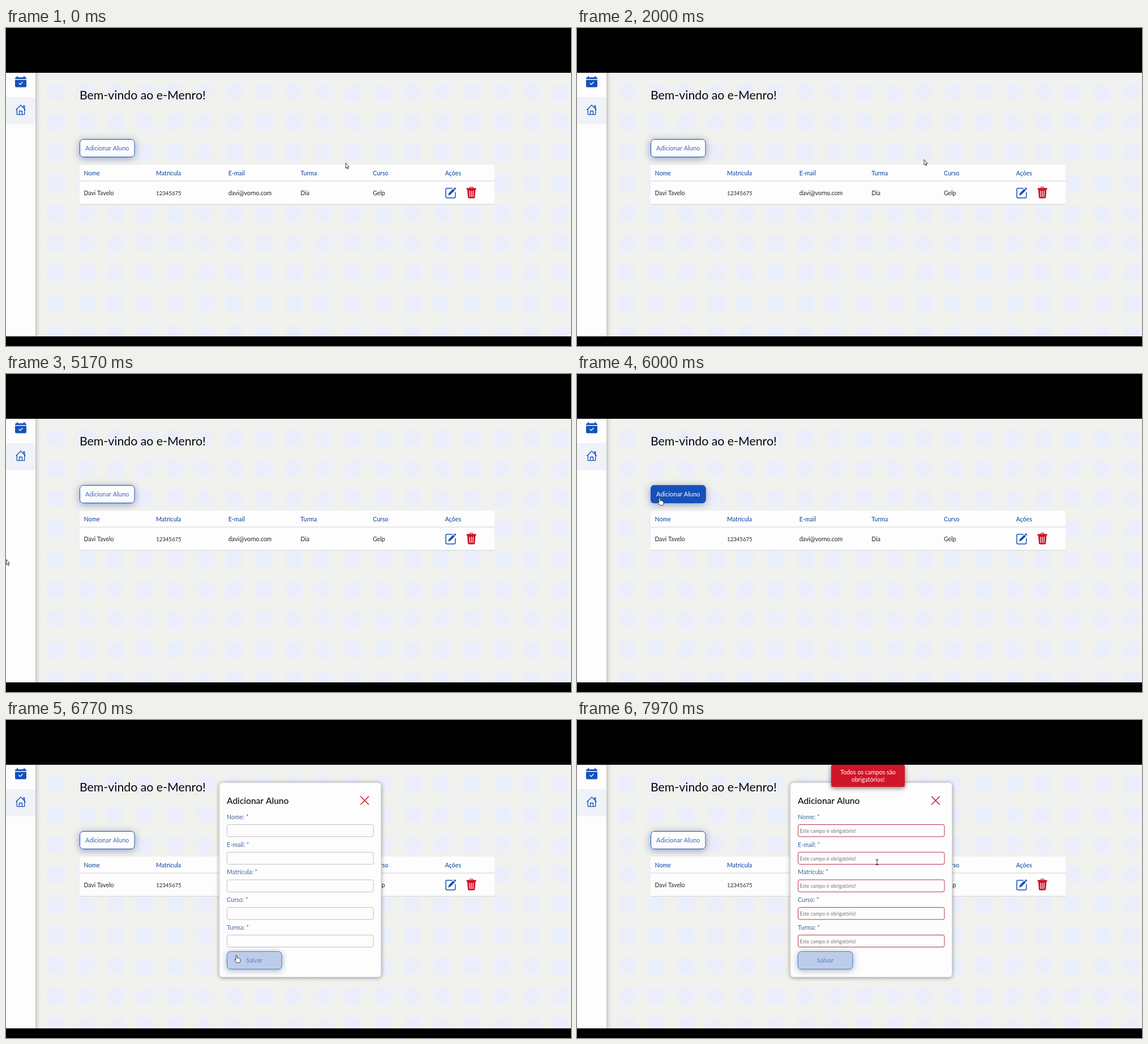
Write an HTML page with a canvas that moves like this. It is 998 by 561 pixels and loops after 8000 ms.

```html
<!DOCTYPE html>
<html lang="pt-BR">
<head>
<meta charset="utf-8">
<title>Cadastro de alunos</title>
<style>
  html, body { margin: 0; width: 100%; height: 100%; overflow: hidden; background: #000; }
  canvas { display: block; width: 100%; height: 100%; }
</style>
</head>
<body>
<canvas id="stage" width="998" height="561"></canvas>
<script>
const W = 998, H = 561, TOP = 79, BOTTOM = 544, LOOP = 8000;
const BLUE = '#1551b9', RED = '#cd1226', FONT = 'Lato, "Open Sans", sans-serif';
const MODAL_AT = 6290, ERROR_AT = 6980;
const canvas = document.getElementById('stage');
const view = canvas.getContext('2d');
let ctx = view;

const addButton = { x: 130, y: 196, w: 97.5, h: 32 };
const saveButton = { x: 390, y: 408, w: 97.5, h: 32 };
const fields = ['Nome', 'E-mail', 'Matrícula', 'Curso', 'Turma'].map((name, i) => (
  { name, x: 390, y: 184 + i * 48.7, w: 259.5, h: 22.3 }
));

// Pointer stops: time, x, y of the hotspot
const stops = [
  [0, 599.5, 238], [1750, 599.5, 238], [2350, 634, 222], [2950, 669, 195],
  [3400, 669, 195], [4150, 520, 262], [4900, 0, 327], [5230, 0, 327],
  [5820, 146, 219], [6330, 146, 219], [6710, 407, 415.5],
  [7080, 407, 415.5], [7720, 530, 251], [8000, 530, 251]
];

function pointerAt(t) {
  const i = Math.max(1, stops.findIndex(s => s[0] > t));
  const [t0, x0, y0] = stops[i - 1], [t1, x1, y1] = stops[i];
  const p = (t - t0) / (t1 - t0), e = p * p * (3 - 2 * p);
  return { x: x0 + (x1 - x0) * e, y: y0 + (y1 - y0) * e };
}

const inside = (p, r) => p.x >= r.x && p.x <= r.x + r.w && p.y >= r.y && p.y <= r.y + r.h;

function text(str, x, y, size, color, weight = 400, align = 'left') {
  ctx.font = `${weight} ${size}px ${FONT}`;
  ctx.textAlign = align;
  ctx.fillStyle = color;
  ctx.fillText(str, x, y + size * 0.36);
}

function box({ x, y, w, h }, radius, fill, border, shadow) {
  ctx.save();
  ctx.beginPath();
  ctx.roundRect(x, y, w, h, radius);
  if (shadow) [ctx.shadowColor, ctx.shadowBlur, ctx.shadowOffsetY] = shadow;
  ctx.fillStyle = fill;
  ctx.fill();
  ctx.restore();
  if (!border) return;
  ctx.strokeStyle = border;
  ctx.lineWidth = 1;
  ctx.beginPath();
  ctx.roundRect(x + 0.5, y + 0.5, w - 1, h - 1, radius);
  ctx.stroke();
}

function stroke(path, color, width, x = 0, y = 0) {
  ctx.save();
  ctx.translate(x, y);
  ctx.strokeStyle = color;
  ctx.lineWidth = width;
  ctx.lineCap = ctx.lineJoin = 'round';
  ctx.stroke(new Path2D(path));
  ctx.restore();
}

function fill(path, color, x = 0, y = 0) {
  ctx.save();
  ctx.translate(x, y);
  ctx.fillStyle = color;
  ctx.fill(new Path2D(path));
  ctx.restore();
}

function drawPattern() {
  ctx.fillStyle = '#f1f2ee';
  ctx.fillRect(0, TOP, W, BOTTOM - TOP);
  ctx.save();
  ctx.filter = 'blur(3px)';
  ctx.fillStyle = '#eaedfc';
  for (let x = 88; x < W + 20; x += 52.5)
    for (let y = 113; y < BOTTOM + 20; y += 53.4)
      ctx.fillRect(x - 14, y - 14, 28, 28);
  ctx.restore();
}

function drawSidebar() {
  box({ x: -10, y: TOP - 20, w: 62, h: 505 }, 0, '#fdfdfd', null, ['rgba(0,0,0,.35)', 9, 0]);
  ctx.fillStyle = '#eff2f7';
  ctx.fillRect(0, 122, 52, 48);
  // Calendar
  fill('M0 5V4Q0 2 2 2H3V0H5V2H15V0H17V2H18Q20 2 20 4V5Z', BLUE, 16, 85);
  fill('M0 6.5H20V17Q20 19.5 17.5 19.5H2.5Q0 19.5 0 17Z', BLUE, 16, 85);
  stroke('M7 12.5L9.2 14.7L13.2 10.5', '#fff', 1.3, 16, 85);
  // House
  stroke('M17.8 144.3L26 136L34.2 144.3M19.3 143V152.6H32.7V143M23.5 152.4V146.5H28.5V152.4M30.8 140.5V137.2H32.7V142.5',
    BLUE, 1.3);
}

function drawTable() {
  box({ x: 130, y: 241, w: 733, h: 70 }, [4, 4, 0, 0], '#fdfdfd');
  ctx.fillStyle = '#cfd0d2';
  ctx.fillRect(130, 269.5, 733, 1);
  ctx.fillRect(130, 310.5, 733, 1);
  const columns = [
    ['Nome', 'Davi Tavelo'], ['Matrícula', '12345675'], ['E-mail', 'davi@vorno.com'],
    ['Turma', 'Dia'], ['Curso', 'Gelp'], ['Ações', '']
  ];
  columns.forEach(([head, cell], i) => {
    const x = 137.5 + i * 127.6;
    text(head, x, 256, 10.6, '#1c4fa6', 500);
    text(cell, x, 291.3, i === 1 ? 9.6 : 10.5, '#222');
  });
  // Edit
  stroke('M12 1.8H3Q.8 1.8 .8 4V16.5Q.8 18.7 3 18.7H15.5Q17.7 18.7 17.7 16.5V9', BLUE, 1.5, 776, 281);
  fill('M5 14.5L6.2 10.3L14 2.5L16.8 5.3L9 13.1ZM14.8 1.7L16 .5Q16.6 0 17.2 .5L18.7 2Q19.2 2.6 18.7 3.2L17.5 4.5Z',
    BLUE, 776, 281);
  // Delete
  fill('M0 3.2Q0 2.2 1 2.2H5.5V1.2Q5.5 0 6.7 0H10.3Q11.5 0 11.5 1.2V2.2H16Q17 2.2 17 3.2V5H0Z', RED, 813.5, 280);
  fill('M1.3 5H15.7L14.7 18.5Q14.5 20.5 12.5 20.5H4.5Q2.5 20.5 2.3 18.5Z', RED, 813.5, 280);
  stroke('M5.2 7.5L5.6 17.5M8.5 7.5V17.5M11.8 7.5L11.4 17.5M7 1.6H10', '#fff', 1.2, 813.5, 280);
}

function drawAddButton(hover) {
  box(addButton, 6, hover ? BLUE : '#fdfdfd', BLUE, ['rgba(50,70,125,.5)', 13, 2]);
  text('Adicionar Aluno', 178.7, 212.2, 11, hover ? '#fff' : '#3d66b3', 400, 'center');
}

function drawModal(error) {
  box({ x: 376.5, y: 110, w: 286.5, h: 344 }, 6, '#fdfdfd', '#d5d6da', ['rgba(0,0,0,.4)', 7, 1]);
  text('Adicionar Aluno', 390, 142.5, 15.5, '#080808', 500);
  stroke('M626.5 135L640.5 149M640.5 135L626.5 149', RED, 1.5);
  for (const f of fields) {
    text(f.name + ': *', f.x, f.y - 12.8, 10.7, '#41639f');
    box(f, 3, '#fdfdfd', error ? '#b83349' : '#bfc0c5');
    if (error) text('Este campo é obrigatório!', f.x + 3.5, f.y + 11.7, 8.9, '#777');
  }
  box(saveButton, 6, '#bdcde9', '#4f7fc9', ['rgba(50,70,125,.45)', 11, 2]);
  text('Salvar', 438.5, 424.3, 11, '#5580c9', 400, 'center');
}

function drawToast() {
  box({ x: 449, y: TOP, w: 130, h: 39 }, 3, '#d01529', null, ['rgba(0,0,0,.55)', 8, 2]);
  text('Todos os campos são', 514, 92, 10.6, '#fff', 400, 'center');
  text('obrigatórios!', 514, 105, 10.6, '#fff', 400, 'center');
}

function drawPointer({ x, y }, kind) {
  if (kind === 'beam') {
    stroke('M-2 -4.5H2M0 -4.5V4.5M-2 4.5H2', '#333', 1, x, y);
    return;
  }
  const shape = kind === 'hand'
    ? 'M-1.2 1Q-1.2 -.5 0 -.5Q1.2 -.5 1.2 1V4.5Q2.8 3.8 3.4 5Q5 4.5 5.4 5.8Q7 5.6 7 7V9Q7 11 5.6 12.5H.2Q-1.2 10.5 -3 8.2Q-3.4 6.8 -2 6.8L-1.2 7.5Z'
    : 'M.5 .5V9.6L2.5 7.7L3.9 10.8L5.2 10.2L3.8 7.2H6.2Z';
  fill(shape, '#fff', x, y);
  stroke(shape, '#222', 0.9, x, y);
}

function makeBackdrop() {
  const layer = document.createElement('canvas');
  layer.width = W;
  layer.height = H;
  ctx = layer.getContext('2d');
  ctx.fillStyle = '#000';
  ctx.fillRect(0, 0, W, H);
  ctx.beginPath();
  ctx.rect(0, TOP, W, BOTTOM - TOP);
  ctx.clip();
  drawPattern();
  drawSidebar();
  text('Bem-vindo ao e-Menro!', 130, 118.7, 21.3, '#080808');
  drawTable();
  ctx = view;
  return layer;
}

const backdrop = makeBackdrop();

function draw(t) {
  const pointer = pointerAt(t);
  const modal = t >= MODAL_AT, error = t >= ERROR_AT;
  const onAdd = inside(pointer, addButton);
  const onSave = modal && inside(pointer, saveButton);
  const onField = modal && fields.some(f => inside(pointer, f));

  ctx.drawImage(backdrop, 0, 0);
  ctx.save();
  ctx.beginPath();
  ctx.rect(0, TOP, W, BOTTOM - TOP);
  ctx.clip();
  drawAddButton(onAdd);
  if (modal) drawModal(error);
  if (error) drawToast();
  drawPointer(pointer, onAdd || onSave ? 'hand' : onField ? 'beam' : 'arrow');
  ctx.restore();
}

const start = performance.now();
function tick() {
  draw((performance.now() - start) % LOOP);
  requestAnimationFrame(tick);
}
tick();
</script>
</body>
</html>
```
